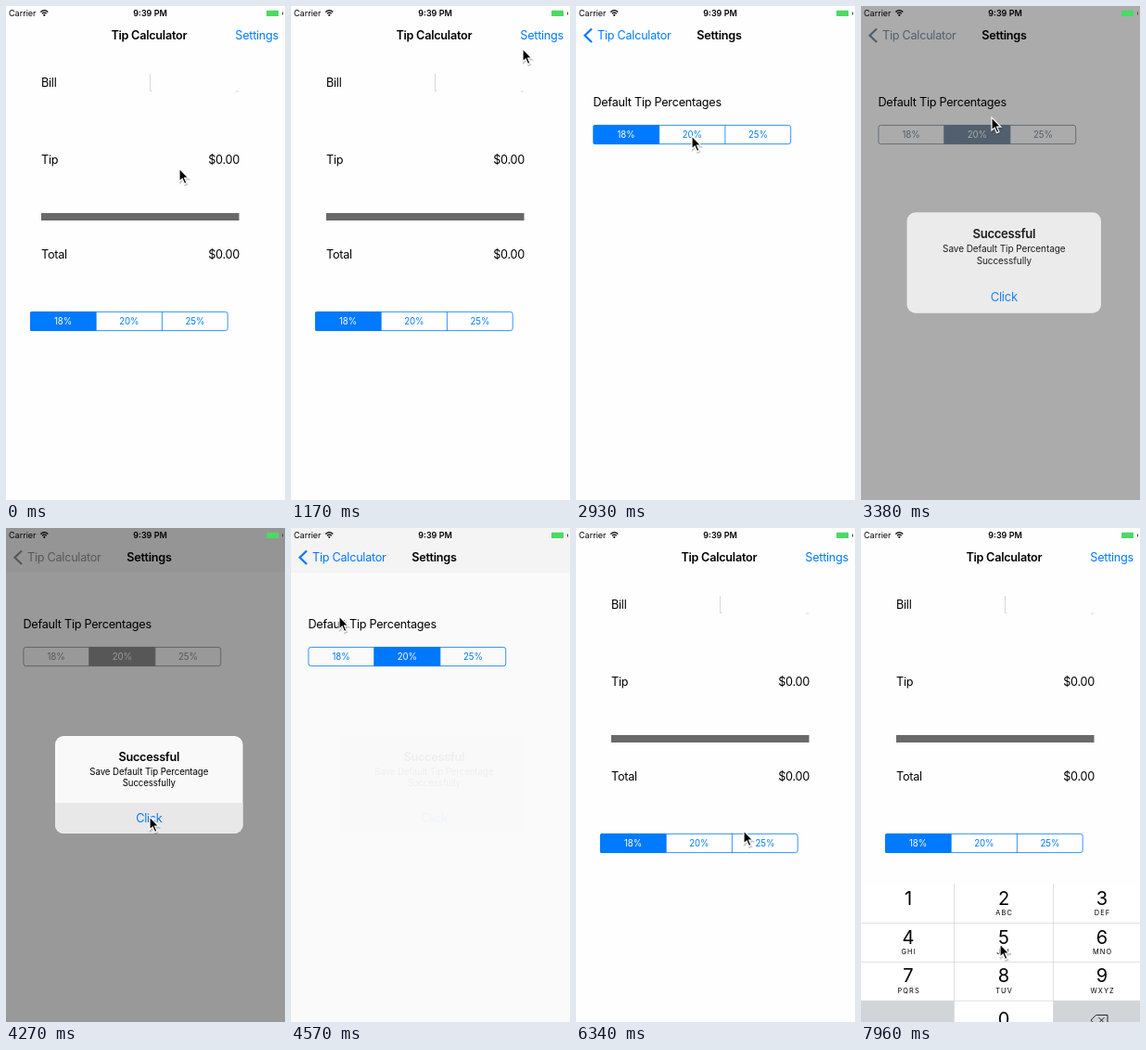
Animation of 301x532 px, one loop 8 s. Source, as an HTML page:

```html
<!DOCTYPE html>
<html lang="en">
<head>
<meta charset="utf-8">
<title>Tip Calculator</title>
<style>
  html, body { margin: 0; width: 100%; height: 100%; overflow: hidden; background: #fff; }
  svg { display: block; width: 100vw; height: 100vh; font-family: Inter, Roboto, sans-serif; --tint: #007aff; }
  .tint { fill: var(--tint); }
  .line { fill: none; stroke: var(--tint); }
</style>
</head>
<body>
<svg id="stage" viewBox="0 0 301 532"></svg>
<script>
const LOOP = 8000, STEP = 147.5, WIDTH = 308;
const BODY = 12.65, SMALL = 9.67;
const stage = document.getElementById('stage');

// y is the middle of the capital letters
function text(str, x, y, size = BODY, attrs = '') {
  const spacing = size === BODY ? -0.25 : size === SMALL ? -0.08 : 0;
  return `<text x="${x}" y="${(y + size * 0.364).toFixed(2)}" font-size="${size}" letter-spacing="${spacing}" ${attrs}>${str}</text>`;
}
const MID = 'text-anchor="middle"', END = 'text-anchor="end"', BOLD = 'font-weight="600"';

function segments(x, y, id) {
  const w = 71.2, h = 21, inset = 0.4;
  const labels = ['18%', '20%', '25%'].map((label, i) =>
    text(label, x + w * (i + 0.5), y + 10.4, SMALL, `${MID} class="label"`)).join('');
  return `<g id="${id}" data-x="${x}" data-w="${w}">
    <rect class="tint chosen" x="${x}" y="${y}" width="${w}" height="${h}" rx="1.5"/>
    <rect class="line" x="${x + inset}" y="${y + inset}" width="${w * 3 - 2 * inset}" height="${h - 2 * inset}" rx="2.5" stroke-width=".8"/>
    <path class="line" d="M${x + w} ${y}v${h}M${x + 2 * w} ${y}v${h}" stroke-width=".8"/>${labels}</g>`;
}

function keypad() {
  const top = 380, row = 41.8, centers = [51, 154, 260];
  const letters = ['', 'ABC', 'DEF', 'GHI', 'JKL', 'MNO', 'PQRS', 'TUV', 'WXYZ'];
  const keys = letters.map((word, i) => {
    const x = centers[i % 3], y = top + row * Math.floor(i / 3);
    return text(i + 1, x, y + 15.5, 20, MID) +
      text(word, x + 0.6, y + 31.3, 7.4, `${MID} style="letter-spacing:1.1px"`);
  }).join('');
  return `<rect y="${top}" width="${WIDTH}" height="170" fill="#fff"/>
    <path d="M0 506H100.5V550H0ZM207.5 506H308V550H207.5Z" fill="#d1d5da"/>
    <path d="M100.5 380V550M207.5 380V550M0 422.500H308M0 464.300H308M0 506.100H308" stroke="#d6d8db" stroke-width=".8"/>
    ${keys}${text(0, 154, 526, 20, MID)}
    <path d="M248 527l5.500-5.500h12.500v11h-12.500zM256.500 524l6 6m0-6l-6 6" fill="none" stroke="#222"/>`;
}

const ARROW = 'M0 0V14L3.200 11.100L5.500 16.600L7.900 15.600L5.600 10.200H9.800Z';

stage.innerHTML = `
  <g id="main">
    <rect width="${WIDTH}" height="548" fill="#fefefe"/>
    ${text('Bill', 38, 82.5)}
    <path d="M155.500 73V91.500h2M248 92h3" fill="none" stroke="#d0d0d0" stroke-width=".8"/>
    ${text('Tip', 38, 165)}${text('$0.00', 252, 165, BODY, END)}
    <rect x="38" y="223" width="213.500" height="8" fill="#696969"/>
    ${text('Total', 38, 267.5)}${text('$0.00', 252, 267.5, BODY, END)}
    ${segments(26, 329, 'mainSegments')}
  </g>
  <g id="settings">
    <rect x="-2" width="${WIDTH + 2}" height="548" fill="#fefefe"/>
    ${text('Default Tip Percentages', 18.5, 103.7)}
    ${segments(18.5, 128, 'settingsSegments')}
  </g>
  <rect width="301" height="48" fill="#fefefe"/>
  <rect id="navShade" width="301" height="48" fill="#000" opacity=".022"/>
  <g id="mainNav">
    ${text('Tip Calculator', 154.3, 31.5, BODY, `${MID} ${BOLD}`)}
    ${text('Settings', 294, 31.5, BODY, `${END} class="tint"`)}
  </g>
  <g id="backNav">
    <path class="line" d="M17 24.500L9.500 31.800L17 39" stroke-width="2.200"/>
    <g id="backLabel">${text('Tip Calculator', 23, 31.5, BODY, 'class="tint"')}</g>
    <g id="settingsTitle">${text('Settings', 154.5, 31.5, BODY, `${MID} ${BOLD}`)}</g>
  </g>
  ${text('Carrier', 3, 7.8, 9)}
  <path d="M37.300 6.500Q41.300 2.800 45.300 6.500M38.900 8.200Q41.300 6 43.700 8.200" fill="none" stroke="#000" stroke-width="1.200"/>
  <circle cx="41.300" cy="9.800" r="1.100"/>
  ${text('9:39 PM', 155.5, 7.8, 9, `${MID} ${BOLD}`)}
  <g id="keypad">${keypad()}</g>
  <rect id="dim" width="301" height="532"/>
  <rect x="281" y="4.800" width="13" height="6.200" rx=".6" fill="#4cd964"/>
  <path d="M298.500 6.500v3" stroke="#444"/>
  <g id="alert">
    <rect x="53" y="224" width="202.500" height="105" rx="9" fill="#f9f9f9"/>
    <path id="pressed" d="M53 296h202.500v24a9 9 0 0 1-9 9h-184.500a9 9 0 0 1-9-9z" fill="#e8e8e8"/>
    ${text('Successful', 154.3, 246, BODY, `${MID} ${BOLD}`)}
    ${text('Save Default Tip Percentage', 154.3, 262, SMALL, MID)}
    ${text('Successfully', 154.3, 274, SMALL, MID)}
    ${text('Click', 154.3, 312.5, BODY, `${MID} fill="#007aff"`)}
  </g>
  <g id="pointer">
    <path d="${ARROW}" transform="translate(.6 1.600)" stroke="#000" stroke-width="1.500" opacity=".2"/>
    <path d="${ARROW}" stroke="#fff" stroke-width="1.200"/>
  </g>`;

const el = Object.fromEntries([...stage.querySelectorAll('[id]')].map(node => [node.id, node]));

// time, x, y of the pointer tip
const pointerPath = [
  [0, 187, 175], [140, 187, 175], [440, 116, 340], [600, 130, 341], [800, 200, 338],
  [1175, 250, 46], [1320, 257, 32], [1400, 257, 32], [1765, 179.5, 192.5], [2250, 150, 162],
  [2750, 125, 140], [3200, 125, 140], [3387, 141, 120], [3800, 165, 285], [4130, 155, 311],
  [4275, 155, 311], [4567, 52, 95], [4720, 50, 34], [4870, 50, 34], [5755, 118, 200],
  [6000, 120, 345], [6337, 181, 326], [6490, 228, 347], [6600, 239, 338], [6930, 190, 88],
  [7080, 180, 77], [7450, 180, 77], [7960, 150, 448]
];

const clamp = v => Math.min(1, Math.max(0, v));
const mix = (a, b, p) => a + (b - a) * p;

// Critically damped spring from 0 to 1
function spring(time) {
  const x = Math.max(0, time) * 0.018;
  return 1 - Math.exp(-x) * (1 + x);
}

function pointerAt(t) {
  const i = pointerPath.findIndex(key => key[0] > t);
  if (i < 0) return pointerPath.at(-1).slice(1);
  const [t0, x0, y0] = pointerPath[i - 1], [t1, x1, y1] = pointerPath[i];
  const u = (t - t0) / (t1 - t0), p = u * u * (3 - 2 * u);
  return [mix(x0, x1, p), mix(y0, y1, p)];
}

const move = (node, x, y = 0) => node.setAttribute('transform', `translate(${x} ${y})`);
const fade = (node, opacity) => node.setAttribute('opacity', opacity);
const show = (node, visible) => node.setAttribute('visibility', visible ? 'inherit' : 'hidden');

function choose(group, index) {
  const { x, w } = group.dataset;
  group.querySelector('.chosen').setAttribute('x', +x + w * index);
  group.querySelectorAll('.label').forEach((label, i) =>
    label.setAttribute('fill', i === index ? '#fff' : 'var(--tint)'));
}

function render(t) {
  const push = t < 4850 ? spring(t - 1345) : 1 - spring(t - 4850);
  move(el.main, -0.3 * WIDTH * push);
  move(el.settings, WIDTH * (1 - push));
  move(el.mainNav, -80 * push);
  fade(el.mainNav, clamp(1 - 1.5 * push));
  fade(el.backNav, push);
  move(el.backLabel, 90 * (1 - push));
  move(el.settingsTitle, 130 * (1 - push));
  show(el.navShade, t > 3600 && t < 4850);

  choose(el.mainSegments, 0);
  choose(el.settingsSegments, t < 3150 ? 0 : 1);

  const appear = spring(t - 3210), leave = clamp((t - 4290) / 290);
  const shown = appear * (1 - leave), scale = 1 + 0.2 * (1 - appear);
  fade(el.dim, 0.4 * shown);
  fade(el.alert, shown);
  el.alert.setAttribute('transform', `translate(154.3 276.5) scale(${scale}) translate(-154.3 -276.5)`);
  show(el.pressed, t > 4200 && t < 4350);
  const gray = leave > 0.85 ? 0 : shown;
  stage.style.setProperty('--tint', `rgb(${[0, 122, 255].map(c => Math.round(mix(c, 145, gray)))})`);

  move(el.keypad, 0, 168 * (1 - spring(t - 7630)));
  move(el.pointer, ...pointerAt(t));
}

// The picture advances in even steps, about seven per second
function tick(now) {
  const step = Math.floor((now % LOOP + 25) / STEP);
  render(Math.max(0, step * STEP - 5));
  requestAnimationFrame(tick);
}
tick(0);
</script>
</body>
</html>
```
